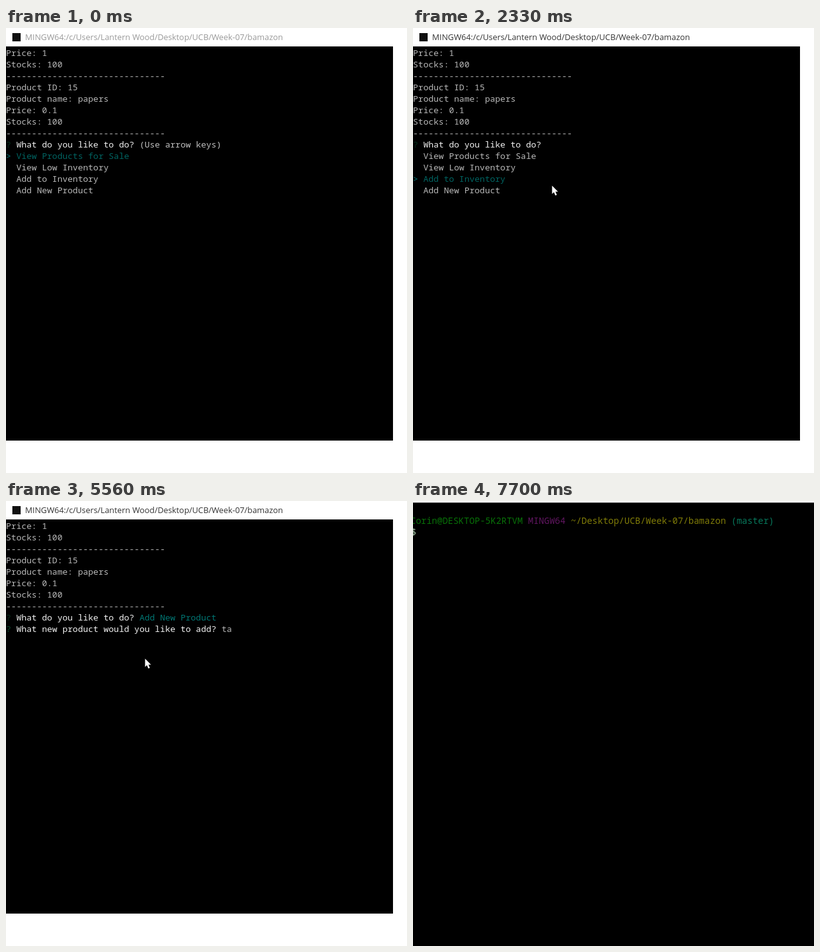
An HTML page with a canvas that plays this animation: 630x700 px, repeating every 8000 ms.

```html
<!DOCTYPE html>
<html lang="en">
<head>
<meta charset="utf-8">
<title>Terminal</title>
<style>
html, body { margin: 0; width: 100%; height: 100%; overflow: hidden; background: #fff; }
canvas { display: block; }
</style>
</head>
<body>
<canvas id="stage" width="630" height="700"></canvas>
<script>
const ctx = document.getElementById('stage').getContext('2d');
const LOOP = 8000, CELL = 8.064, ROW = 18, BASE = 44;
const MONO = '"Noto Sans Mono", "DejaVu Sans Mono", monospace';
const GREY = '#b8b8b8', BRIGHT = '#f2f2f2', TEAL = '#007673', DIM_TEAL = '#006462';
const GREEN = '#084b2c', DIM_GREEN = '#04301a', FAINT_GREEN = '#021a0c';

// When each part of the session begins
const POINT = 200, FOCUS = 1140, BROWSE = 2180, CHOOSE = 3030, ANSWER = 5960, ENTER = 6910, SHELL = 7700;
const BLINK = 540, KEY_HOLD = 240;

const header = ['Price: 1', 'Stocks: 100', '-'.repeat(31), 'Product ID: 15',
  'Product name: papers', 'Price: 0.1', 'Stocks: 100', '-'.repeat(31)];
const menu = ['View Products for Sale', 'View Low Inventory', 'Add to Inventory', 'Add New Product'];

// Bursts of typing: start, gap between keys, keys (\b deletes)
const keys = [[4610, 50, 'ch\b\b'], [5010, 200, 'ta'], [ANSWER, 125, 'ble'], [6410, 0, 's']]
  .flatMap(([start, gap, chars]) => [...chars].map((char, i) => ({ char, time: start + i * gap })));

// Pointer strokes: start, duration, end point
const strokes = [[POINT, 200, 232, 260], [550, 50, 225, 251], [950, 30, 218, 248]];

const clamp = (v, max = 1) => Math.max(0, Math.min(max, v));
const easeOut = u => 1 - (1 - u) ** 2;

const selected = t => clamp(Math.floor((t - BROWSE) / 150) + 1, menu.length - 1);

const typedBy = t => keys.filter(key => key.time <= t)
  .reduce((word, { char }) => char === '\b' ? word.slice(0, -1) : word + char, '');

function cursorOn(t) {
  const lit = Math.floor((t - SHELL) / BLINK) % 2 !== 0;
  return lit || keys.some(({ time }) => t >= time && t < time + KEY_HOLD);
}

function pointerAt(t) {
  let x = 386, y = 632;
  for (const [start, duration, endX, endY] of strokes) {
    const u = easeOut(clamp((t - start) / duration));
    x += (endX - x) * u;
    y += (endY - y) * u;
  }
  return [x, y];
}

function box(color, x, y, w, h) {
  ctx.fillStyle = color;
  ctx.fillRect(x, y, w, h);
}

function text(str, x, y, color) {
  ctx.fillStyle = color;
  ctx.fillText(str, x, y);
}

const put = (str, col, row, color = GREY) => text(str, col * CELL, BASE + row * ROW, color);

function ask(row, question, mark) {
  put('?', 0, row, mark);
  put(question, 2, row, BRIGHT);
}

function drawCursor(col, row) {
  box('#f4f4f4', Math.round(col * CELL), BASE - 1 + row * ROW, 8, 5);
}

function drawPointer([x, y]) {
  ctx.save();
  ctx.translate(x, y);
  ctx.fillStyle = '#fff';
  ctx.fill(new Path2D('M.5 0V13L3.4 10.3 5.6 15.6 8 14.6 5.8 9.4H9.8Z'));
  ctx.restore();
}

function drawMenu(t) {
  const chosen = selected(t);
  ask(8, 'What do you like to do?', DIM_GREEN);
  if (t < BROWSE) put('(Use arrow keys)', 26, 8, '#c0c0c0');
  menu.forEach((item, i) => put(item, 2, 9 + i, i === chosen ? DIM_TEAL : GREY));
  put('>', 0, 9 + chosen, TEAL);
}

function drawQuestions(t) {
  const word = typedBy(t), entered = t >= ENTER;
  ask(8, 'What do you like to do?', DIM_GREEN);
  put(menu[3], 26, 8, TEAL);
  ask(9, 'What new product would you like to add?', t < ANSWER ? GREEN : FAINT_GREEN);
  put(word, 42, 9, entered ? TEAL : GREY);
  if (entered) ask(10, 'What department would you like to put?', DIM_GREEN);
  if (cursorOn(t)) entered ? drawCursor(41, 10) : drawCursor(42 + word.length, 9);
}

function drawWindow(t) {
  box('#fff', 0, 0, 630, 700);
  box('#000', 0, 29, 608, 620);
  box('#111', 10, 8, 13, 13);
  ctx.font = '12.85px "Open Sans", "Noto Sans", sans-serif';
  text('MINGW64:/c/Users/Lantern Wood/Desktop/UCB/Week-07/bamazon', 30, 18.5, t < FOCUS ? '#999' : '#333');
  ctx.font = `13.44px ${MONO}`;
  header.forEach((line, i) => put(line, 0, i));
  t < CHOOSE ? drawMenu(t) : drawQuestions(t);
  if (t >= POINT) drawPointer(pointerAt(t));
}

function drawShell() {
  box('#000', 0, 0, 630, 700);
  box('#fff', 0, 0, 630, 2.5);
  ctx.font = `14px ${MONO}`;
  let x = -4;
  for (const [str, color] of [['Corin@DESKTOP-5K2RTVM ', '#087008'], ['MINGW64 ', '#601660'],
    ['~/Desktop/UCB/Week-07/bamazon ', '#807c08'], ['(master)', '#08785c']]) {
    text(str, x, 36, color);
    x += str.length * 8.4;
  }
  text('$', -3, 54, '#a8c8a8');
}

const begin = performance.now();
function frame() {
  const t = (performance.now() - begin) % LOOP;
  t < SHELL ? drawWindow(t) : drawShell();
  requestAnimationFrame(frame);
}
frame();
</script>
</body>
</html>
```
